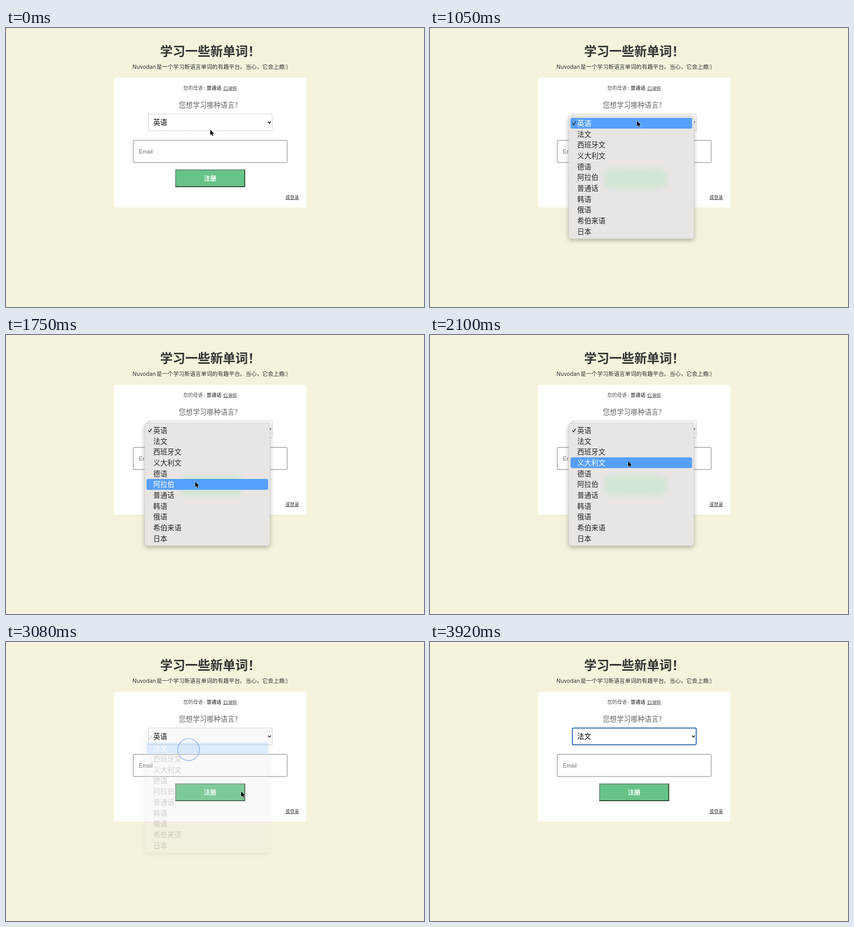
An HTML page that plays this animation: 800x533 px, repeating every 4.69 s.

```html
<!DOCTYPE html>
<html lang="zh-CN">
<head>
<meta charset="utf-8">
<title>学习一些新单词</title>
<style>
  html, body { margin: 0; width: 100%; height: 100%; overflow: hidden; background: #f5f3dc; }
  svg { display: block; width: 100vw; height: 100vh; }
  text { font-family: "Noto Sans CJK SC", "Noto Sans CJK", sans-serif; white-space: pre; }
  .mid { text-anchor: middle; }
  .bold { font-weight: 700; }
  .line { fill: none; stroke-linecap: round; stroke-linejoin: round; }
  #menu text { font-size: 13.5px; fill: #262626; }
  #menu text.on { fill: #fff; font-weight: 500; }
</style>
</head>
<body>
<svg viewBox="0 0 800 533">
  <defs>
    <filter id="shadow" x="-20%" y="-20%" width="140%" height="140%">
      <feDropShadow dx="0" dy="3" stdDeviation="4" flood-color="#000" flood-opacity=".28"/>
    </filter>
    <filter id="soft" x="-20%" y="-40%" width="140%" height="180%">
      <feGaussianBlur stdDeviation="4"/>
    </filter>
  </defs>
  <rect width="800" height="533" fill="#f5f3dc"/>
  <text class="mid bold" x="391" y="52.5" font-size="24" fill="#333">学习一些新单词！</text>
  <g fill="#333" font-size="10.67">
    <text x="242" y="78.3" style="font-family: Inter, sans-serif" font-size="10.5">Nuvodan</text>
    <text x="288" y="78.3">是一个学习新语言单词的有趣平台。当心，它会上瘾:)</text>
  </g>

  <rect x="207" y="95" width="367.5" height="248" rx="2" fill="#fff"/>
  <g fill="#555" font-size="9.33">
    <text x="339.3" y="118.4">您的母语 :</text>
    <text class="bold" x="384" y="118.4">普通话</text>
    <text x="425.6" y="118.4" font-size="8">编辑</text>
  </g>
  <path class="line" d="M415.5 119.6H441.5" stroke="#555" stroke-width=".8"/>
  <path class="line" d="M421 112.5H417.5V118.7H423.5V116M420 116.2L424.6 111.5" stroke="#555"/>
  <text x="330.8" y="152" font-size="13.33" fill="#666">您想学习哪种语言?</text>

  <rect id="box" x="272.5" y="164.3" width="237" height="32"/>
  <text id="choice" x="281.7" y="185.2" font-size="13.33" fill="#000"></text>
  <path class="line" d="M501.8 179.3L504.2 181.8L506.6 179.3" stroke="#000" stroke-width="1.4"/>

  <rect x="243.5" y="214.7" width="294.7" height="42.3" rx="1" fill="#fff" stroke="#808080"/>
  <text x="254.3" y="240" font-size="10.67" fill="#757575" style="font-family: 'Liberation Sans', Arial, sans-serif">Email</text>

  <rect x="324" y="270.5" width="133.5" height="33.3" fill="#68c388"/>
  <path d="M324.6 303.5V271.1H457" fill="none" stroke="#6d756f" stroke-width="1.3"/>
  <path d="M324 303.2H456.9V270.5" fill="none" stroke="#1c2a21" stroke-width="1.4"/>
  <text class="mid bold" x="390.7" y="291.9" font-size="12" fill="#fff">注册</text>
  <text x="534.8" y="326.6" font-size="8.67" fill="#333">或登录</text>
  <path d="M534.8 327.9H561" stroke="#333" stroke-width=".8"/>

  <g id="menu">
    <rect x="265.5" y="168" width="239.7" height="234.7" rx="5" fill="#e9e5e3" stroke="#c9c6c2" stroke-width=".6" filter="url(#shadow)"/>
    <rect x="332" y="268" width="123" height="39" rx="17" fill="#d3e6d6" filter="url(#soft)"/>
    <rect id="bar" x="269" width="232.7" height="20.6" rx="3" fill="#56a0fb"/>
    <path class="line" d="M272.8 182.6L275 185.2L278.6 179.2" stroke="#262626" stroke-width="1.4"/>
  </g>
  <circle id="ring" fill="#4a90e8" fill-opacity=".06" stroke="#3f82dc" stroke-width="1.5"/>
  <path id="cursor" d="M0 0V10.2L2.4 8L4 11.6L5.8 10.8L4.2 7.4H7.3Z" fill="#000" stroke="#fff" stroke-width=".9" stroke-linejoin="round" paint-order="stroke"/>
</svg>
<script>
const LOOP = 4690, STEP = 70, ROW = 20.67, TOP = 171.7;
const LANGS = ["英语", "法文", "西班牙文", "义大利文", "德语", "阿拉伯", "普通话", "韩语", "俄语", "希伯来语", "日本"];
const $ = id => document.getElementById(id);
const set = (el, attrs) => { for (const k in attrs) el.setAttribute(k, attrs[k]); };

// Pointer: time, x, y
const PATH = [
  [0, 391, 194.5], [350, 396, 177.5], [1050, 396, 177.5], [1330, 349.5, 255],
  [1610, 358, 290], [2100, 379, 241], [2730, 349.5, 204], [2940, 349.5, 204],
  [3080, 450, 285.5], [3150, 540, 342], [3220, 586, 365]
];
const FADE = [[2940, 1], [3010, .6], [3080, .2], [3150, .07], [3220, 0]];
const CLICKS = [[350, 396, 178.5], [2800, 349.5, 205.5]];

function sample(table, t, ease = p => p) {
  if (t <= table[0][0]) return table[0].slice(1);
  for (let i = 1; i < table.length; i++) {
    const a = table[i - 1], b = table[i];
    if (t <= b[0]) {
      const p = ease((t - a[0]) / (b[0] - a[0]));
      return a.slice(1).map((v, k) => v + (b[k + 1] - v) * p);
    }
  }
  return table[table.length - 1].slice(1);
}
const smooth = p => p * p * (3 - 2 * p);
const pointer = t => sample(PATH, t, t < 2940 ? smooth : undefined);

const items = LANGS.map((name, i) => {
  const el = document.createElementNS("http://www.w3.org/2000/svg", "text");
  set(el, { x: 281.8, y: TOP + ROW * (i + .5) + 4.9 });
  el.textContent = name;
  return $("menu").appendChild(el);
});

function draw(t) {
  const [x, y] = pointer(t);
  set($("cursor"), { transform: `translate(${x} ${y})`, opacity: t < 3360 ? 1 : 0 });

  const focused = t >= 630 && t < 1050 || t >= 3220;
  set($("box"), focused
    ? { fill: "#fff", stroke: "#1f5ea8", "stroke-width": 1.8, "stroke-dasharray": "none", rx: 2 }
    : { fill: "#fff", stroke: "#b5b5b5", "stroke-width": .9, "stroke-dasharray": "1.5 .8", rx: 0 });
  $("choice").textContent = LANGS[t < 3220 ? 0 : 1];

  // The highlight trails the pointer by one step
  const hoverY = pointer(Math.min(t - STEP, 2870))[1];
  const row = Math.max(0, Math.floor((hoverY - TOP) / ROW));
  set($("menu"), { opacity: t < 1050 ? 0 : sample(FADE, t)[0] });
  set($("bar"), { y: TOP + row * ROW });
  items.forEach((el, i) => el.classList.toggle("on", i === row));

  const click = CLICKS.find(c => t >= c[0] && t < c[0] + 420);
  set($("ring"), { opacity: 0 });
  if (click) {
    const age = t - click[0];
    set($("ring"), { cx: click[1], cy: click[2], r: 10.4 + age * .038, opacity: 1 - age / 520 });
  }
}

function tick(now) {
  draw(Math.floor(now % LOOP / STEP) * STEP);
  requestAnimationFrame(tick);
}
draw(0);
requestAnimationFrame(tick);
</script>
</body>
</html>
```
